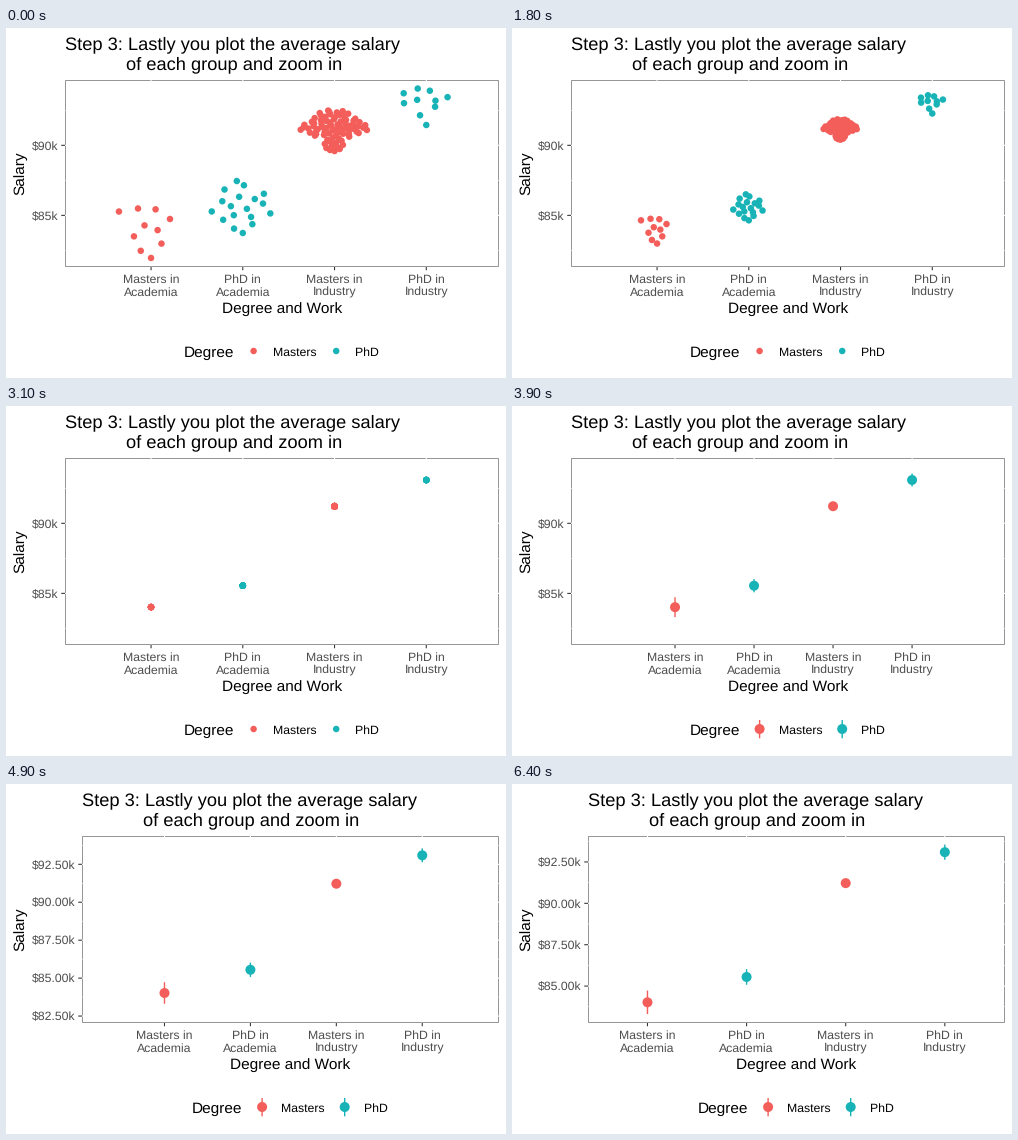
Write a matplotlib script that moves like this. It is 500 px wide and 350 px high and loops after 8000 ms.

```python
import matplotlib.pyplot as plt
import numpy as np
from matplotlib.animation import FuncAnimation
from matplotlib.collections import PatchCollection
from matplotlib.patches import Circle, Rectangle

W, H, DPI = 500, 350, 100
STEP, LOOP = 100, 8000
PT = 72 / DPI  # points per pixel

RED, TEAL = "#F35E5A", "#17B3B7"
TICK, LABEL = "#333333", "#4D4D4D"
SMALL, MEDIUM, LARGE = 12.25, 15.35, 18.3

# name, place, colour, mean, error, group size, evenly spaced quantiles ($k)
GROUPS = [
    ("Masters in", "Academia", RED, 84.02, 0.71, 10,
     (81.96, 82.88, 83.81, 84.42, 85.38, 85.49)),
    ("PhD in", "Academia", TEAL, 85.55, 0.47, 18,
     (83.74, 84.81, 85.24, 85.88, 86.42, 87.45)),
    ("Masters in", "Industry", RED, 91.22, 0.25, 76,
     (89.59, 90.69, 91.09, 91.41, 91.81, 92.48)),
    ("PhD in", "Industry", TEAL, 93.09, 0.46, 10,
     (91.45, 92.70, 93.16, 93.27, 93.77, 94.05)),
]

TOP, BOTTOM, RIGHT = 52, 239, 493
X_DOTS = (0.062, 4.785)
X_VIEW = np.array([(-0.32, 5.17), (0.4, 4.6)])
Y_VIEW = np.array([(81.35, 94.64), (82.80, 94.05)])
COLLAPSE, ZOOM, LENGTH = 300, 3400, 3000

plt.rcParams["font.family"] = "Liberation Sans"
plt.rcParams["text.hinting"] = "none"


def van_der_corput(i):
    bits = f"{i:b}"
    return int(bits[::-1], 2) / 2 ** len(bits)


def quasirandom(n, quantiles):
    """Sorted values, spread sideways in proportion to their density."""
    y = np.interp(np.linspace(0, 5, n), range(6), quantiles)
    iqr = np.subtract(*np.percentile(y, [75, 25]))
    width = 0.45 * min(y.std(ddof=1), iqr / 1.34) * n ** -0.2
    density = np.exp(-((y[:, None] - y) / width) ** 2 / 2).sum(axis=1)
    spread = np.array([2 * van_der_corput(i) - 1 for i in range(1, n + 1)])
    return 0.4 * spread * density / density.max(), y


SWARMS = [quasirandom(*group[-2:]) for group in GROUPS]

fig = plt.figure(figsize=(W / DPI, H / DPI), dpi=DPI, facecolor="white")
ax = fig.add_axes([0, 0, 1, 1])


def ease(t):
    """Exponential in-out."""
    if t <= 0:
        return 0.0
    if t >= 1:
        return 1.0
    half = 2 ** (-20 * abs(t - 0.5)) / 2
    return half if t < 0.5 else 1 - half


def text(x, y, s, size, color="black", **kw):
    ax.text(x, y, s, fontsize=size * PT, color=color, va="baseline", **kw)


def line(x0, y0, x1, y1, color, width, z=2):
    ax.plot([x0, x1], [y0, y1], color=color, lw=width * PT, zorder=z,
            solid_capstyle="butt", snap=False)


def dots(xs, ys, color, diameter):
    circles = [Circle(p, diameter / 2)
               for p in zip(np.atleast_1d(xs), np.atleast_1d(ys))]
    ax.add_collection(PatchCollection(circles, facecolor=color, linewidth=0,
                                      zorder=5, snap=False))


def draw_panel(left, px, py, y_range, fine):
    ax.add_patch(Rectangle((left + 0.5, TOP + 0.5), RIGHT - left - 1,
                           BOTTOM - TOP - 1, fill=False, ec="#969696",
                           lw=PT, zorder=1, snap=False))
    # white grid lines cross the border
    gap = 2.5 if fine else 5
    for v in np.arange(80, 96, gap):
        if y_range[0] < v < y_range[1]:
            y = py(v)
            line(left, y, RIGHT, y, "white", 1.07)
            line(left - 3.75, y, left, y, TICK, 1.07, 3)
            label = f"${v:.2f}k" if fine else f"${v:.0f}k"
            text(left - 6.6, y + 4.4, label, SMALL, LABEL, ha="right")
        minor = v + gap / 2
        if y_range[0] < minor < y_range[1]:
            line(left, py(minor), RIGHT, py(minor), "white", 0.53)
    for k, (name, place, *_) in enumerate(GROUPS, 1):
        x = px(k)
        line(x, TOP, x, BOTTOM, "white", 1.07)
        line(x, BOTTOM - 0.5, x, BOTTOM + 3.25, TICK, 1.07, 3)
        text(x, 255, name, SMALL, LABEL, ha="center")
        text(x, 267.9, place, SMALL, LABEL, ha="center")


def draw_titles(left):
    text(left - 0.2, 21, "Step 3: Lastly you plot the average salary", LARGE)
    text(left + 60.8, 41, "of each group and zoom in", LARGE)
    text((left + RIGHT) / 2, 285.3, "Degree and Work", MEDIUM, ha="center")
    text(17.8, 167, "Salary", MEDIUM, rotation=90, rotation_mode="anchor")


def draw_legend(shift, zoomed):
    text(177.7 + shift, 329, "Degree", MEDIUM)
    for x, name, color in ((247.6, "Masters", RED), (330.2, "PhD", TEAL)):
        x += shift
        if zoomed:
            line(x, 314, x, 332.3, color, 1.4, 4)
        dots(x, 323, color, 10 if zoomed else 6.5)
        text(x + 19, 327.6, name, SMALL)


def draw(i):
    ax.clear()
    ax.set(xlim=(0, W), ylim=(H, 0))
    ax.axis("off")

    time = i * STEP
    zoomed = time > ZOOM
    f = ease((time - ZOOM) / LENGTH)
    y_range = Y_VIEW[0] + f * (Y_VIEW[1] - Y_VIEW[0])
    x_range = X_VIEW[0] + f * (X_VIEW[1] - X_VIEW[0]) if zoomed else X_DOTS
    fine = f > 0.155  # the axis switches to denser breaks
    left = 76 if fine else 59

    def px(v):
        part = (v - x_range[0]) / (x_range[1] - x_range[0])
        return left + part * (RIGHT - 0.7 - left)

    def py(v):
        part = (v - y_range[0]) / (y_range[1] - y_range[0])
        return 238.5 - part * 186.2

    draw_panel(left, px, py, y_range, fine)
    draw_titles(left)
    draw_legend((left - 59) / 2, zoomed)

    shrink = 1 - ease((time - COLLAPSE) / LENGTH)
    for k, (group, (dx, values)) in enumerate(zip(GROUPS, SWARMS), 1):
        color, mean, err = group[2:5]
        if zoomed:
            line(px(k), py(mean - err), px(k), py(mean + err), color, 1.4, 4)
            dots(px(k), py(mean), color, 10)
        else:
            dots(px(k + dx * shrink), py(mean + (values - mean) * shrink),
                 color, 6.5)


anim = FuncAnimation(fig, draw, frames=LOOP // STEP, interval=STEP,
                     init_func=lambda: None, repeat=True, repeat_delay=0)
plt.show()
```
